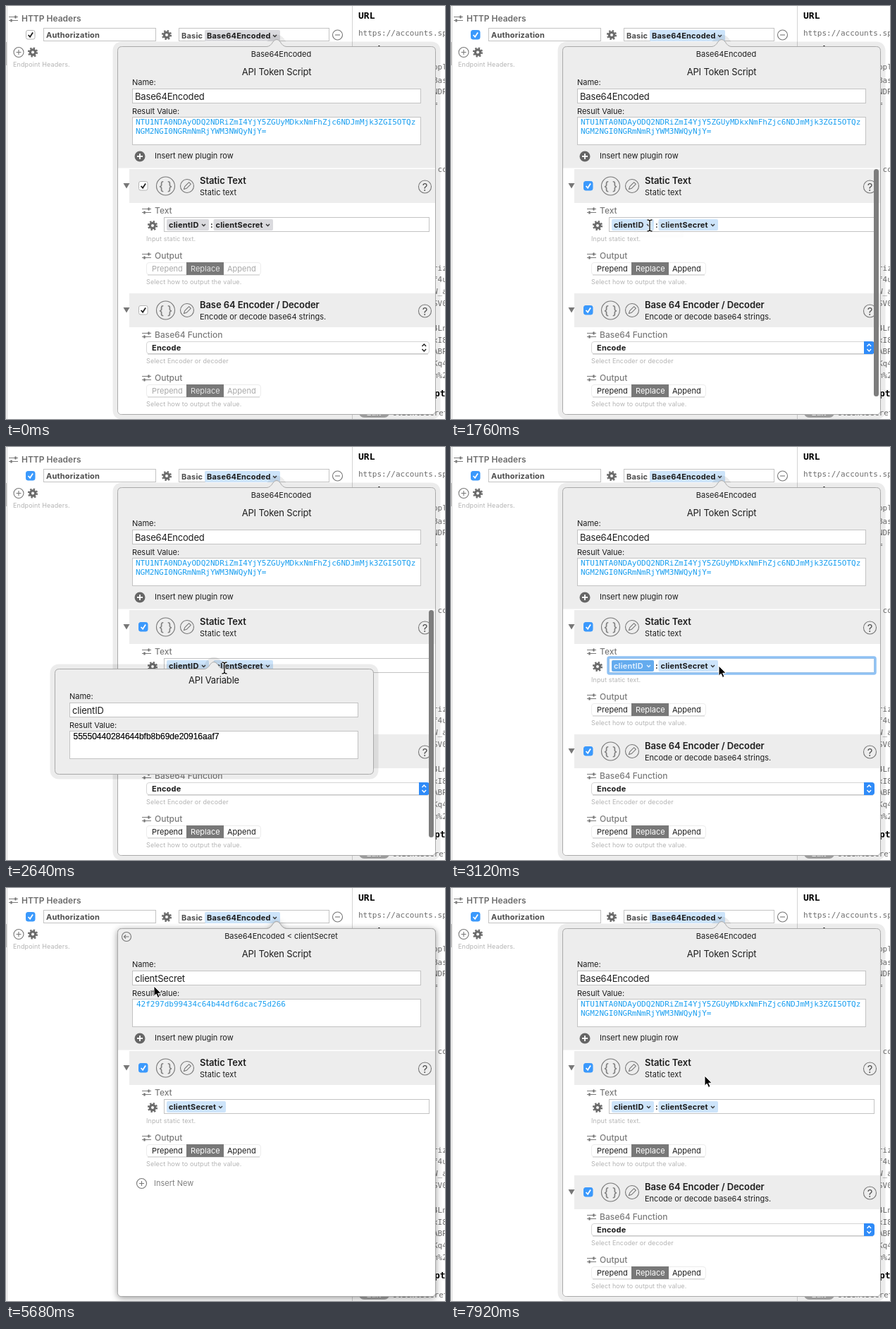
An HTML page that plays this animation: 623 px wide and 585 px high, repeating every 8 s.

```html
<!DOCTYPE html>
<html lang="en">
<head>
<meta charset="utf-8">
<title>Token script popover</title>
<style>
html, body { margin: 0; width: 100%; height: 100%; overflow: hidden; background: #fff; }
svg { display: block; width: 623px; height: 585px; }
text { font: 11px Inter, "Open Sans", sans-serif; fill: #1d1d1d; white-space: pre; }
.big { font-size: 13px; letter-spacing: -.18px; }
.title { font-size: 13px; font-weight: 600; letter-spacing: -.08px; }
.group { font-size: 12px; font-weight: 600; fill: #6c6c6c; }
.label { font-size: 12px; font-weight: 500; fill: #7b7b7b; }
.hint { font-size: 9px; letter-spacing: .12px; fill: #b4b4b4; }
.token { font-weight: 700; letter-spacing: .2px; }
.soft { fill: #4c4c4c; }
.faded { fill: #808080; }
.mid { text-anchor: middle; }
.mono { font: 11px "DejaVu Sans Mono", monospace; fill: #6e6e6e; }
.blue { fill: #1a9ff0; }
.head { font: bold 13px "DejaVu Sans Mono", monospace; fill: #000; }
.plain { font: 12px "Liberation Sans", sans-serif; fill: #000; stroke: #000; stroke-width: .2px; }
.field { fill: #fff; stroke: #c3c3c3; }
.line { fill: none; stroke: #777; stroke-width: 1.1px; }
.chip { fill: #cde4fa; }
.box { fill: #3b99fc; stroke: #3b99fc; }
.tick { fill: none; stroke: #fff; stroke-width: 1.8px; }
.step { fill: #2f8bf8; }
.arrows { fill: none; stroke: #fff; stroke-width: 1.4px; }
.off .chip { fill: #dadade; }
.off .box { fill: #fff; stroke: #b5b5b5; }
.off .tick, .off .arrows { stroke: #222; }
.off .step { fill: none; }
.off .seg { fill: #a8a8a8; }
.off .seg.on { fill: #e4e4e4; }
.seg.on { fill: #fff; }
.picked .first .chip { fill: #64abee; }
.picked .first text { fill: #e6f2ff; font-weight: 600; }
.picked .first path { stroke: #e6f2ff; }
#shade { filter: drop-shadow(0 2px 5px rgba(0, 0, 0, .4)); }
</style>
</head>
<body>
<svg id="stage" viewBox="0 0 623 585"></svg>
<script>
const STEP = 80, LOOP = 8000;
const stage = document.getElementById('stage');

const esc = s => s.replace(/&/g, '&amp;').replace(/</g, '&lt;');
const text = (x, y, s, cls = '') => `<text x="${x}" y="${y}" class="${cls}">${esc(s)}</text>`;
const rect = (x, y, w, h, attrs = '') => `<rect x="${x}" y="${y}" width="${w}" height="${h}" ${attrs}/>`;
const path = (d, attrs = 'class="line"') => `<path d="${d}" ${attrs}/>`;
const circle = (x, y, r, attrs = 'class="line"') => `<circle cx="${x}" cy="${y}" r="${r}" ${attrs}/>`;
const field = (x, y, w, h) => rect(x + .5, y + .5, w - 1, h - 1, 'class="field"');
const group = (id, body) => `<g id="${id}">${body}</g>`;

const gear = (x, y) =>
  circle(x, y, 3.6, 'fill="none" stroke="#6b6b6b" stroke-width="3.2"') +
  circle(x, y, 5.9, 'fill="none" stroke="#6b6b6b" stroke-width="2.4" stroke-dasharray="2.317"');

const sliders = (x, y) =>
  path(`M${x} ${y + 2.5}h13M${x} ${y + 7.5}h13`, 'stroke="#7b7b7b" stroke-width="1.2"') +
  path(`M${x + 9.5} ${y + .5}v4M${x + 3.5} ${y + 5.5}v4`, 'stroke="#7b7b7b" stroke-width="2.4"');

const badge = (x, y, plus) => circle(x, y, 7) + path(`M${x - 3.5} ${y}h7` + (plus ? `M${x} ${y - 3.5}v7` : ''));

const check = (x, y) => rect(x + .5, y + .5, 12.5, 12.5, 'rx="2.5" class="box"') +
  path(`M${x + 3.6} ${y + 7}l2.5 2.8l4-6.4`, 'class="tick"');

const chip = (x, w, base, name) => rect(x, base - 12, w, 16, 'rx="2" class="chip"') +
  text(x + 3, base, name, 'token') +
  path(`M${x + w - 10} ${base - 5}l2.5 2.5l2.5-2.5`, 'fill="none" stroke="#333" stroke-width="1.3"');

const bubble = (x, y, w, h, ax, ah) => {
  const r = 6;
  return `M${x + r} ${y}H${ax - 14}Q${ax - 9} ${y} ${ax - 5} ${y - ah + 4}Q${ax} ${y - ah - 2} ${ax + 5} ${y - ah + 4}` +
    `Q${ax + 9} ${y} ${ax + 14} ${y}H${x + w - r}q${r} 0 ${r} ${r}v${h - 2 * r}q0 ${r} ${-r} ${r}` +
    `H${x + r}q${-r} 0 ${-r} ${-r}V${y + r}q0 ${-r} ${r} ${-r}z`;
};
const ring = d => path(d, 'fill="none" stroke="#000" stroke-opacity=".075" stroke-width="14" stroke-linejoin="round"');
const shell = d => path(d, 'fill="#ededed" stroke="#a9a9a9" stroke-width="1"');

function section(y, title, sub) {
  return rect(175, y, 434, 48, 'fill="#ededed"') +
    path(`M166.5 ${y + 20}h9l-4.5 7.5z`, 'fill="#777"') +
    check(188, y + 17) +
    circle(226.5, y + 24, 13) +
    text(226.5, y + 30, '{ }', 'mid faded" style="font-size:17px;font-weight:500') +
    circle(257, y + 24, 9.5) +
    path(`M252.5 ${y + 28.5}l1.2-3.8l6-6l2.6 2.6l-6 6z`) +
    text(275, y + 21, title, 'title') + text(275, y + 37, sub) +
    circle(594.5, y + 25, 9) + text(594.5, y + 30.5, '?', 'mid soft" style="font-size:15px');
}

const label = (y, s) => sliders(193, y - 9) + text(211, y, s, 'label');

function output(y) {
  return label(y, 'Output') +
    rect(199.5, y + 5.5, 162, 17, 'rx="3.5" fill="#fff" stroke="#ececec"') +
    path(`M201 ${y + 23}h159`, 'stroke="#cbcbcb"') +
    rect(256, y + 5, 53, 18, 'fill="#787878"') +
    text(207, y + 18, 'Prepend', 'seg') + text(262, y + 18, 'Replace', 'seg on') + text(314, y + 18, 'Append', 'seg') +
    text(199, y + 36, 'Select how to output the value.', 'hint');
}

function form(x, y, name) {
  return text(x, y, 'Name:') + field(x, y + 5, 410, 21) + text(x + 4, y + 21, name, 'big') +
    text(x, y + 41, 'Result Value:') + field(x, y + 45, 410, 40);
}

function staticText() {
  return section(231, 'Static Text', 'Static text') + label(294, 'Text') + gear(208, 311) +
    field(224, 299, 377, 21) + text(199, 333, 'Input static text.', 'hint') + output(358);
}

function page() {
  // Clipped right-hand column: baseline and the visible letters.
  const tail = { 90: 'ppl', 109: 'Bas', 125: 'NDR', 142: '=', 235: '.co', 375: 'riz', 391: 'f4u', 408: 'W_a',
    425: 'SV0', 460: '4Ln', 477: 'xI8', 493: 'ABR', 510: 'Kq4', 527: 'm%2' };
  return path('M1.5 0V585M491.5 0V585', 'stroke="#d4d4d4"') +
    path('M.5 51V84', 'stroke="#bbb"') +
    sliders(4, 13) + text(22, 22, 'HTTP Headers', 'group') +
    check(28, 34) + field(53, 31, 160, 19) + text(57, 45, 'Authorization', 'token soft') + gear(228, 41) +
    field(245, 31, 214, 19) + text(249, 46, 'Basic', 'token soft') + chip(282, 107, 46, 'Base64Encoded') +
    badge(470.5, 41) + badge(18, 65.5, true) + gear(38, 65.5) + text(10, 86, 'Endpoint Headers.', 'hint') +
    text(500, 18, 'URL', 'head') + text(500, 42, 'https://accounts.sp', 'mono') + text(500, 66, 'Headers', 'head') +
    Object.entries(tail).map(([y, s]) => text(606, +y, s, 'mono')).join('') +
    text(608, 553, 'pt', 'head') +
    rect(501, 569, 43, 14, 'rx="7" fill="#a9a9a9"') +
    text(522, 580, 'Edit', 'mid" style="fill:#fff;font-weight:700') + text(548, 580, 'clientSecret', 'mono');
}

function mainView() {
  return text(390.5, 72, 'Base64Encoded', 'mid') + form(179, 112, 'Base64Encoded') +
    text(184, 168, 'NTU1NTA0NDAyODQ2NDRiZmI4YjY5ZGUyMDkxNmFhZjc6NDJmMjk3ZGI5OTQz', 'mono blue') +
    text(184, 181, 'NGM2NGI0NGRmNmRjYWM3NWQyNjY=', 'mono blue') +
    staticText() +
    group('focus', rect(223, 298, 379, 23, 'rx="2" fill="none" stroke="#90c2f4" stroke-width="3.5"')) +
    `<g class="first">${chip(228, 60, 314, 'clientID')}</g>` + text(290, 314, ':', 'token') +
    chip(294.5, 84.5, 314, 'clientSecret') +
    section(407, 'Base 64 Encoder / Decoder', 'Encode or decode base64 strings.') +
    label(470, 'Base64 Function') +
    rect(199.5, 475.5, 401, 17, 'rx="3.5" fill="#fff" stroke="#d5d5d5"') +
    path('M201 493h398', 'stroke="#bdbdbd"') +
    text(207, 488, 'Encode', 'token') +
    path('M586 475h11q4 0 4 4v10q0 4-4 4h-11z', 'class="step"') +
    path('M590.5 482l2.8-3l2.8 3m0 4l-2.8 3l-2.8-3', 'class="arrows"') +
    text(199, 506, 'Select Encoder or decoder', 'hint') + output(531);
}

function detailView() {
  return circle(171, 69, 6.5) + path('M174.5 69h-7m2.5-2.5l-2.5 2.5l2.5 2.5') +
    text(390.5, 72, 'Base64Encoded < clientSecret', 'mid') + form(179, 112, 'clientSecret') +
    text(185, 168, '42f297db99434c64b44df6dcac75d266', 'mono blue') +
    staticText() + chip(228, 84, 314, 'clientSecret') +
    badge(192.5, 418.5, true) + text(210, 422, 'Insert New', 'faded');
}

const outer = bubble(158.5, 57.5, 451, 521, 384, 11);
const inner = bubble(69.5, 314.5, 452, 149, 295, 11);

stage.innerHTML = page() + group('halo', ring(outer)) + group('shade', shell(outer)) + shell(outer) +
  path('M159 229.5H609V573q0 5-5 5H164q-5 0-5-5z', 'fill="#fff"') +
  text(384, 98, 'API Token Script', 'big mid') +
  circle(190, 213, 7.5, 'fill="#666"') + path('M186 213h8M190 209v8', 'stroke="#fff" stroke-width="1.8"') +
  text(211, 216, 'Insert new plugin row') +
  group('main', mainView()) + group('detail', detailView()) +
  group('bar', rect(600, 231, 7, 322, 'rx="3.5" fill="#7d7d7d"')) +
  group('pop', ring(inner) + shell(inner) + text(295, 335, 'API Variable', 'big mid') +
    form(90, 357, 'clientID') + text(95.5, 414, '55550440284644bfb8b69de20916aaf7', 'plain')) +
  group('arrow', path('M0 0V14.2L3.2 11.2L5.5 16.4L8 15.3L5.7 10.3H10.2z',
    'fill="#000" stroke="#fff" stroke-width="1" stroke-linejoin="round"')) +
  group('beam', ['#fff" stroke-width="3', '#111" stroke-width="1.4'].map(c =>
    path('M-3.5-8Q0-8 0-6Q0-8 3.5-8M0-6V6M-3.5 8Q0 8 0 6Q0 8 3.5 8', `fill="none" stroke="${c}"`)).join(''));

const part = Object.fromEntries([...stage.querySelectorAll('[id]')].map(g => [g.id, g]));
const show = (id, on) => { part[id].style.display = on ? '' : 'none'; };

// Pointer track: time, x, y
const track = [[320, 384, 42], [880, 207, 300], [1040, 207, 300], [1520, 282, 311], [2080, 282, 311],
  [2480, 310, 313], [2640, 310, 313], [3120, 380, 310], [3280, 380, 310], [3600, 372, 308], [4080, 372, 308],
  [4480, 259, 305], [4800, 236, 300], [4880, 236, 300], [5200, 240, 290], [5360, 240, 290], [5680, 210, 139],
  [6080, 172, 68], [6240, 172, 68], [6400, 174, 71], [7600, 174, 71], [7920, 360, 266]];
// Small popover: time, scale, opacity
const zoom = [[0, 0, 0], [1760, .15, .08], [1840, .7, .85], [1920, 1.04, 1], [2000, 1, 1], [2720, 1, .5], [2800, 0, 0]];

function pointer(t) {
  const i = track.findIndex(k => k[0] > t);
  if (i < 0) return track[track.length - 1].slice(1);
  if (i === 0) return track[0].slice(1);
  const [a, b] = [track[i - 1], track[i]];
  const p = (t - a[0]) / (b[0] - a[0]), e = p * p * (3 - 2 * p);
  return [1, 2].map(n => Math.round(a[n] + (b[n] - a[n]) * e));
}

function draw(time) {
  const t = Math.floor(time % LOOP / STEP) * STEP;
  const within = (a, b) => t >= a && t < b;
  const inDetail = within(3680, 6960), picked = within(2720, 3680), typing = within(1200, 2720);
  const smooth = within(4160, 6960);
  stage.classList.toggle('off', t < 1360);
  stage.classList.toggle('picked', picked);
  show('main', !inDetail);
  show('detail', inDetail);
  show('halo', !smooth);
  show('shade', smooth);
  show('focus', picked);
  show('bar', within(480, 2720));
  const [, s, o] = zoom.filter(k => k[0] <= t).pop();
  show('pop', o > 0);
  part.pop.setAttribute('opacity', o);
  part.pop.setAttribute('transform', `translate(295 303) scale(${s}) translate(-295 -303)`);
  const [x, y] = pointer(t);
  show('arrow', t >= 320 && !typing);
  show('beam', typing);
  for (const id of ['arrow', 'beam']) part[id].setAttribute('transform', `translate(${x} ${y})`);
}

const start = performance.now();
function tick() {
  draw(performance.now() - start);
  requestAnimationFrame(tick);
}
tick();
</script>
</body>
</html>
```
